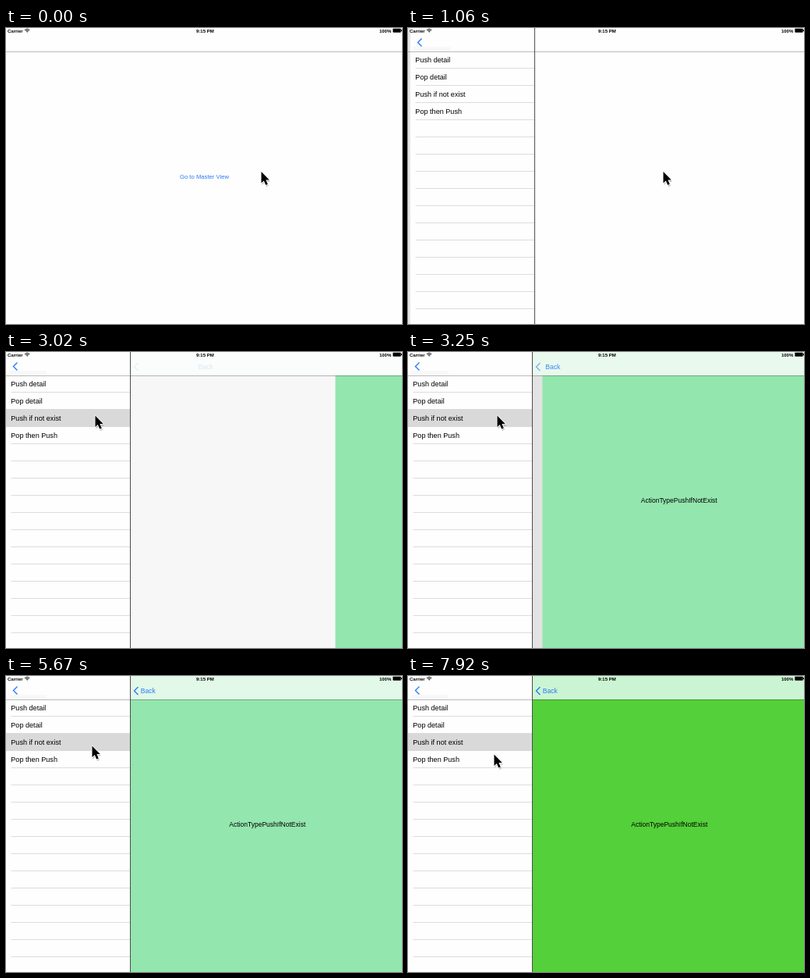
Recreate the animation shown at these times as an HTML page. Size 508 by 379 pixels, loop 8000 ms.

```html
<!DOCTYPE html>
<html lang="en">
<head>
<meta charset="utf-8">
<title>Split view navigation</title>
<style>
  html, body { margin: 0; width: 100%; height: 100%; overflow: hidden; background: #fefefe; }
  svg { display: block; width: 100vw; height: 100vh; }
  text { font-family: "Liberation Sans", Arial, sans-serif; }
  .status text { font-size: 6px; font-weight: bold; }
  .blue { fill: #2a7bf6; }
  .chevron { fill: none; stroke: #2a7bf6; stroke-width: 1.4; }
  .rule { stroke: #000; stroke-opacity: .27; }
  .cell { font-size: 9.1px; }
</style>
</head>
<body>
<svg viewBox="0 0 508 379" preserveAspectRatio="none">
  <defs>
    <clipPath id="pane"><rect x="160" width="348" height="379"/></clipPath>
  </defs>
  <rect width="508" height="379" fill="#fefefe"/>

  <g id="home">
    <text class="blue" x="254.5" y="192.7" font-size="7.7" text-anchor="middle">Go to Master View</text>
    <path class="rule" d="M0 30.5H508"/>
  </g>
  <rect id="homeDim" width="508" height="379"/>

  <g id="split">
    <rect width="508" height="379" fill="#fefefe"/>
    <rect x="4" y="24" width="48" height="6" fill="#f8f8f8"/>
    <path class="chevron" d="M14.5 13.5l-5 5 5 5"/>
    <g id="table"></g>

    <g clip-path="url(#pane)">
      <rect id="paneDim" x="160" width="348" height="379"/>
      <g id="detail">
        <rect id="page" x="160" width="348" height="379"/>
        <text x="335.3" y="193" font-size="8.52" text-anchor="middle">ActionTypePushIfNotExist</text>
      </g>
      <rect id="bar" x="160" width="348" height="30"/>
      <path id="backArrow" class="chevron" d="M169.5 14l-5 5 5 5"/>
      <text id="back" class="blue" x="172.8" y="22.2" font-size="8.6">Back</text>
    </g>

    <path class="rule" d="M0 30.5H508"/>
    <path d="M159.5 0V379" stroke="#4c4c4c"/>
  </g>

  <g class="status">
    <text x="2" y="5.5">Carrier</text>
    <g fill="none" stroke="#000" stroke-width=".9">
      <path d="M24 2.7Q27.2 -.1 30.4 2.7M25.3 3.9Q27.2 2.2 29.1 3.9"/>
    </g>
    <path d="M26.2 4.7Q27.2 3.9 28.2 4.7L27.2 5.7Z"/>
    <text x="255.3" y="5.5" text-anchor="middle">9:15 PM</text>
    <text x="494.3" y="5.5" text-anchor="end">100%</text>
    <rect x="496.3" y=".8" width="10.4" height="4.9" rx=".8"/>
    <rect x="507" y="2.2" width="1" height="2"/>
  </g>

  <g id="pointer">
    <circle id="press" cx="2" cy=".5" r="10" fill="#fff" fill-opacity=".15" stroke="#111" stroke-width="1.1"/>
    <path d="M.8 1.5V17l3.4-3 2.4 5.4 3-1.3-2.3-5.2h4.4Z" fill="#000" opacity=".22"/>
    <path d="M0 0V14.6L3.3 11.5 5.7 17 8.3 15.9 5.9 10.4H10.3Z" fill="#000" stroke="#fff" stroke-width="1.6" stroke-linejoin="round" paint-order="stroke"/>
  </g>
</svg>
<script>
const LOOP = 8000;
const $ = id => document.getElementById(id);
const set = (id, attrs) => {
  for (const name in attrs) $(id).setAttribute(name, attrs[name]);
};

// Table rows
const rowTop = i => 30 + 22 * i;
const labels = ["Push detail", "Pop detail", "Push if not exist", "Pop then Push"];
let rows = "";
for (let i = 1; i <= 15; i++) rows += `<path d="M6.5 ${rowTop(i) - .5}H159" stroke="#dcdcdf"/>`;
rows += `<rect id="selected" y="${rowTop(2) - 1}" width="159" height="23" fill="#d9d9d9"/>`;
labels.forEach((label, i) => {
  rows += `<text class="cell" x="6.3" y="${rowTop(i) + 14.2}">${label}</text>`;
});
$("table").innerHTML = rows;

const HOME_PUSH = 666, DETAIL_PUSH = 2969;
const pages = [
  { at: 0, page: "#93e6ae", bar: [226, 248, 232] },
  { at: 5730, page: "#db9c40", bar: [247, 232, 211] },
  { at: 6920, page: "#54d03a", bar: [203, 245, 210] }
];
const presses = [[590, 665], [2900, 2960], [5610, 5670], [6740, 6860]];
const moves = [
  { from: 1650, to: 2360, x: 114.5, y: 81.5 },
  { from: 4450, to: 4910, x: 110.5, y: 97.5 },
  { from: 5150, to: 5260, x: 110.5, y: 89.5 },
  { from: 7750, to: 7920, x: 110.5, y: 100.5 }
];

const clamp = v => Math.min(1, Math.max(0, v));
const smooth = v => v * v * (3 - 2 * v);

// Remaining share of a critically damped push, from 1 to 0
function remaining(ms) {
  const s = 18.26 * Math.max(0, ms) / 1000;
  return ms > 560 ? 0 : (1 + s) * Math.exp(-s);
}

function pointerAt(t) {
  let x = 327.5, y = 184;
  for (const m of moves) {
    const k = smooth(clamp((t - m.from) / (m.to - m.from)));
    x += (m.x - x) * k;
    y += (m.y - y) * k;
  }
  return `translate(${x} ${y})`;
}

function draw(t) {
  const a = remaining(t - HOME_PUSH);
  set("home", { transform: `translate(${-152 * (1 - a)} 0)` });
  set("homeDim", { opacity: .1 * (1 - a) });
  set("split", { transform: `translate(${508 * a} 0)` });

  const b = remaining(t - DETAIL_PUSH);
  const fade = clamp((t - DETAIL_PUSH) / 500);
  const look = pages.filter(p => p.at <= t).pop();
  const tint = clamp(fade * 1.35);
  const bar = look.bar.map(c => Math.round(254 + (c - 254) * tint));
  set("paneDim", { opacity: .11 * (1 - b) });
  set("detail", { transform: `translate(${348 * b} 0)` });
  set("page", { fill: look.page });
  set("bar", { fill: `rgb(${bar})` });
  set("backArrow", { opacity: fade });
  set("back", { opacity: clamp(fade * 1.6), transform: `translate(${98 * b} 0)` });
  set("selected", { opacity: t >= 2960 ? 1 : 0 });

  set("pointer", { transform: pointerAt(t) });
  set("press", { opacity: presses.some(([on, off]) => t >= on && t < off) ? 1 : 0 });
}

const start = performance.now();
function tick() {
  draw((performance.now() - start) % LOOP);
  requestAnimationFrame(tick);
}
tick();
</script>
</body>
</html>
```
